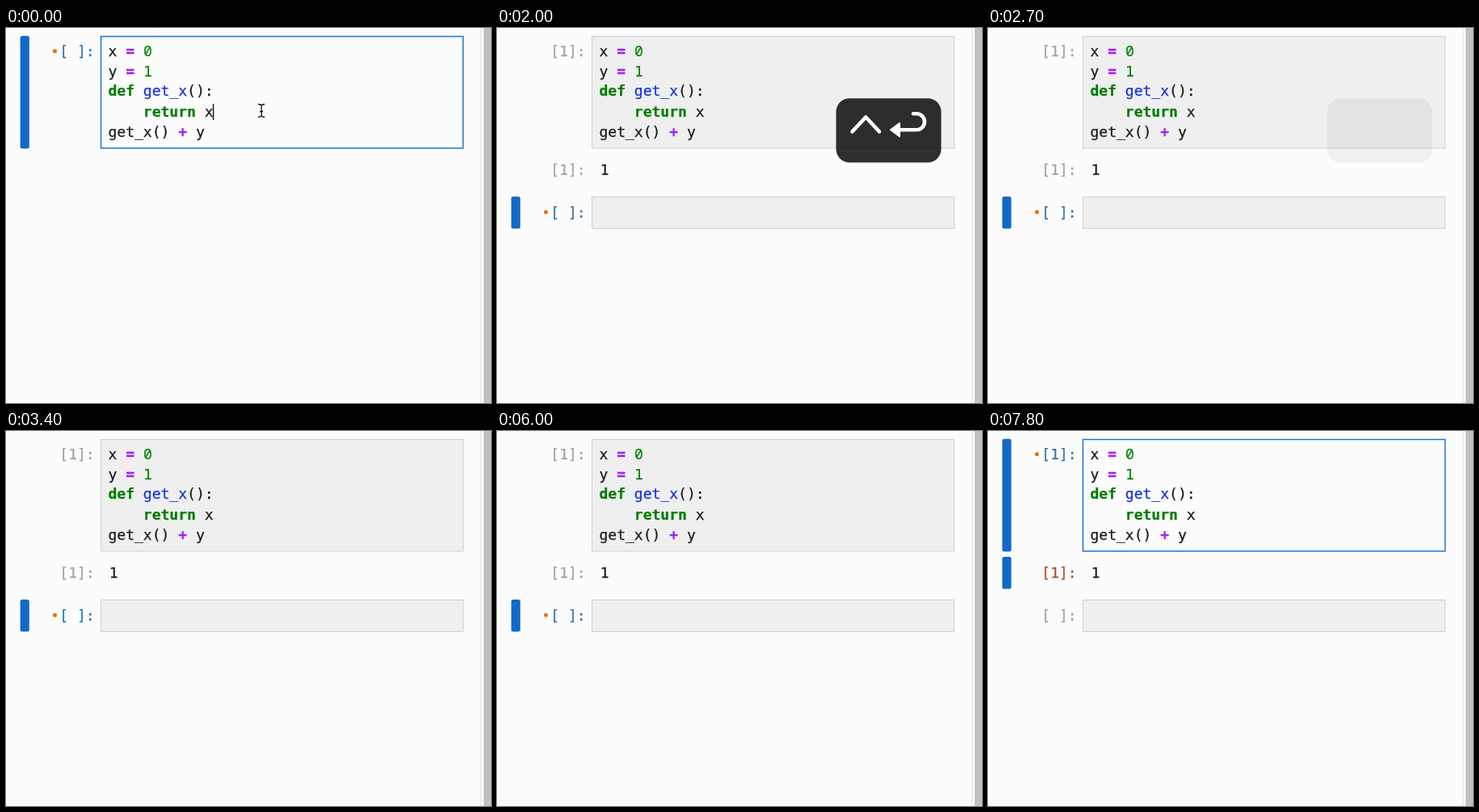
An HTML page for the animation above (8 s loop, 600x465 px).

```html
<!DOCTYPE html>
<html lang="en">
<head>
<meta charset="utf-8">
<style>
  html, body { margin: 0; height: 100%; overflow: hidden; background: #fcfcfc; }
  svg { display: block; width: 600px; height: 465px; }
  text { font: 18px "DejaVu Sans Mono", monospace; white-space: pre; color: #1a1a1a; }
  text, tspan { fill: currentColor; stroke: currentColor; stroke-width: .25; }
  .bar { fill: #1269c7; }
  .dot { fill: #ef6c00; }
  .box { fill: #efefef; stroke: #cfcfcf; }
  .box.edit { fill: #fcfcfc; stroke: #1b74cf; stroke-width: 1.5; }
  .kw { color: #007c00; font-weight: bold; }
  .num { color: #008400; }
  .zero { font-family: "Noto Sans Mono", monospace; }
  .op { color: #a022f5; font-weight: bold; }
  .fn { color: #1530dd; }
  .prompt { color: #a0a0a0; }
  .on .prompt { color: #2c74ab; }
  .on .prompt.out { color: #b04a2c; }
  g:not(.on) > .bar, g:not(.on) > .dot, .hidden { display: none; }
</style>
</head>
<body>
<svg viewBox="0 0 600 465">
  <path d="M587.5 0V465" stroke="#e2e2e2"/>
  <rect x="588" width="3" height="465" fill="#f7f7f7"/>
  <rect x="591" width="9" height="465" fill="#c0c0c0"/>

  <g id="first">
    <rect class="bar" x="17.6" y="9.8" width="11.2" height="139.8" rx="2.5"/>
    <circle class="dot" cx="60.5" cy="28.8" r="2.5"/>
    <text class="prompt" id="count" x="66.3" y="35"></text>
    <rect class="box" id="editor" x="117.5" y="10.5" width="448" height="138.5"/>
    <text x="126.5" y="34.5">x <tspan class="op">=</tspan> <tspan class="num zero">0</tspan></text>
    <text x="126.5" y="60">y <tspan class="op">=</tspan> <tspan class="num">1</tspan></text>
    <text x="126.5" y="84"><tspan class="kw">def</tspan> <tspan class="fn">get_x</tspan>():</text>
    <text x="126.5" y="110">    <tspan class="kw">return</tspan> x</text>
    <text x="126.5" y="135">get_x() <tspan class="op">+</tspan> y</text>
  </g>

  <g id="output">
    <rect class="bar" x="17.6" y="156" width="11.2" height="39.8" rx="2.5"/>
    <text class="prompt out" x="66.3" y="181.5">[1]:</text>
    <text x="127.8" y="181.5">1</text>
  </g>

  <g id="second">
    <rect class="bar" x="17.6" y="209" width="11.2" height="39.8" rx="2.5"/>
    <circle class="dot" cx="60.5" cy="228.3" r="2.5"/>
    <text class="prompt" x="66.3" y="234.7">[ ]:</text>
    <rect class="box" x="117.5" y="209.5" width="448" height="39"/>
  </g>

  <g id="cursors" fill="none" stroke="#111">
    <path d="M256.5 94V114" stroke-width="1.4"/>
    <path d="M312 94.5Q316 94.5 316 97Q316 94.5 320 94.5M316 96V109M312 110.5Q316 110.5 316 108Q316 110.5 320 110.5M314 103.5H318" stroke-width="1.3"/>
  </g>

  <g id="keys">
    <rect x="419.5" y="87.2" width="130" height="79.6" rx="16.5" fill-opacity=".81"/>
    <g id="symbols" fill="none" stroke="#fff" stroke-width="4.6" stroke-linecap="round" stroke-linejoin="round">
      <path d="M439.5 128.5L456.2 110.5L473 128.5"/>
      <path d="M515 106.3H519A9.9 9.9 0 0 1 519 126.2H498"/>
      <path d="M487 126.2L498 118V134.4Z" fill="#fff" stroke-width="2"/>
    </g>
  </g>
</svg>
<script>
  const LOOP = 8000, STEP = 100;
  const RUN = 500, ADD = 2000, BACK = 7000, EDIT = 7400;
  const presses = [[RUN, 1000], [ADD, 2500]]; // shown at, starts fading at
  const $ = id => document.getElementById(id);
  const toggle = (id, name, on) => $(id).classList.toggle(name, on);

  function keyOpacity(t) {
    const press = presses.findLast(([start]) => t >= start);
    return press ? Math.max(0, Math.min(1, 1 - (t - press[1]) / 212)) : 0;
  }

  function draw(now) {
    const t = Math.floor(now % LOOP / STEP) * STEP;
    const firstActive = t < ADD || t >= BACK;
    toggle("first", "on", firstActive);
    toggle("output", "on", firstActive);
    toggle("second", "on", !firstActive);
    toggle("output", "hidden", t < RUN);
    toggle("second", "hidden", t < ADD);
    toggle("cursors", "hidden", t >= RUN);
    toggle("editor", "edit", t < RUN || t >= EDIT);
    $("count").textContent = t < RUN ? "[ ]:" : "[1]:";
    // The symbols fade faster than their panel.
    $("keys").style.opacity = $("symbols").style.opacity = keyOpacity(t);
    requestAnimationFrame(() => draw(performance.now()));
  }
  draw(performance.now());
</script>
</body>
</html>
```
